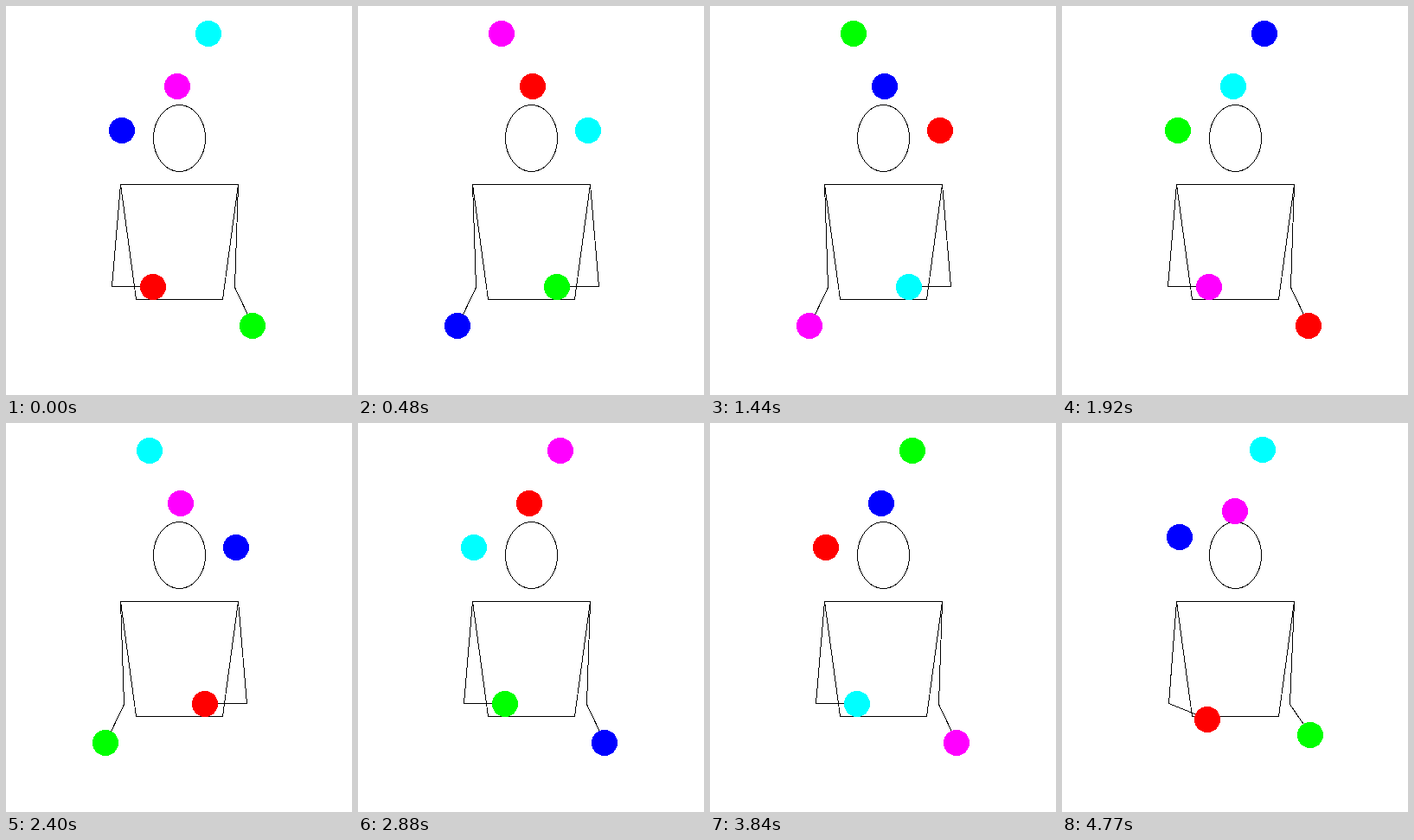
Recreate the animation shown at these times as an HTML page. Size 400x450 px, loop 4.8 s.

```html
<!DOCTYPE html>
<html lang="en">
<head>
<meta charset="utf-8">
<title>Five ball cascade</title>
<style>
html, body { margin: 0; width: 100%; height: 100%; overflow: hidden; background: #fff; }
svg { display: block; width: 400px; height: 450px; }
</style>
</head>
<body>
<svg viewBox="0 0 400 450" shape-rendering="crispEdges">
  <g fill="none" stroke="#000" stroke-width="1">
    <ellipse cx="200.5" cy="153" rx="30" ry="38.5"/>
    <path d="M132.5 206.5H268.5L250.5 339.5H150.5Z"/>
    <polyline class="arm"/>
    <polyline class="arm"/>
  </g>
  <g id="balls"></g>
</svg>
<script>
const STEP = 30, LOOP = 160;         // ms per step, steps per loop
const CYCLE = 32, FLIGHT = 59.2;     // steps between throws of one hand, steps in the air
const HALF = 80;                     // steps from a throw to the next throw of that ball
const CATCH = FLIGHT + CYCLE - HALF; // steps from a throw to the next catch of that hand
const MID = 200, BASE = 324.8, GRAV = 0.3359;
const IN = 30, VX = 2, VY = GRAV * FLIGHT;
const OUT = VX * FLIGHT - IN;
const SHOULDER = 68, SHOULDER_Y = 206, UPPER = 118.6;
const COLORS = ['#f00', '#0ff', '#0f0', '#f0f', '#00f'];

const arms = [...document.querySelectorAll('.arm')];
const group = document.getElementById('balls');
const balls = COLORS.map(fill => {
  const c = document.createElementNS('http://www.w3.org/2000/svg', 'circle');
  c.setAttribute('r', 15);
  c.setAttribute('fill', fill);
  return group.appendChild(c);
});

// cubic from a to b over span, with end speeds va and vb
function hermite(s, span, a, b, va, vb) {
  const r = 1 - s;
  return a * r * r * (1 + 2 * s) + b * s * s * (3 - 2 * s)
    + span * s * r * (va * r - vb * s);
}

// hand place p steps after its throw; d is the distance outward from the middle
function hand(p) {
  if (p < CATCH) {
    const s = p / CATCH;
    return {
      d: hermite(s, CATCH, IN, OUT, -VX, VX / 2),
      y: hermite(s, CATCH, BASE, BASE, -VY, VY / 2)
    };
  }
  const span = CYCLE - CATCH, s = (p - CATCH) / span;
  return {
    d: hermite(s, span, OUT, IN, VX / 2, -VX),
    y: hermite(s, span, BASE, BASE, VY / 2, -VY)
  };
}

// ball place n steps after a throw, d measured toward the catching side
function ball(n) {
  if (n > FLIGHT) return hand(n - HALF + CYCLE);
  return { d: VX * n - IN, y: BASE - GRAV * n * (FLIGHT - n) };
}

function drawArm(el, side, p) {
  const h = hand(p), d = Math.round(h.d);
  const bend = (d - SHOULDER) / 4;
  const points = [
    [SHOULDER, SHOULDER_Y],
    [SHOULDER + Math.round(-bend), Math.round(SHOULDER_Y + Math.sqrt(UPPER * UPPER - bend * bend))],
    [d, Math.round(h.y) - 1]
  ];
  el.setAttribute('points',
    points.map(([x, y]) => `${MID + side * x + 0.5},${y + 0.5}`).join(' '));
}

function draw(f) {
  drawArm(arms[0], -1, f % CYCLE);
  drawArm(arms[1], 1, (f + CYCLE / 2) % CYCLE);
  balls.forEach((el, i) => {
    const age = (f + i * CYCLE) % LOOP;
    const side = age < HALF ? 1 : -1;
    const pos = ball(age % HALF);
    el.setAttribute('cx', MID + side * Math.round(pos.d));
    el.setAttribute('cy', Math.round(pos.y));
  });
}

const start = performance.now();
function tick() {
  draw(Math.floor((performance.now() - start) / STEP) % LOOP);
  requestAnimationFrame(tick);
}
tick();
</script>
</body>
</html>
```
